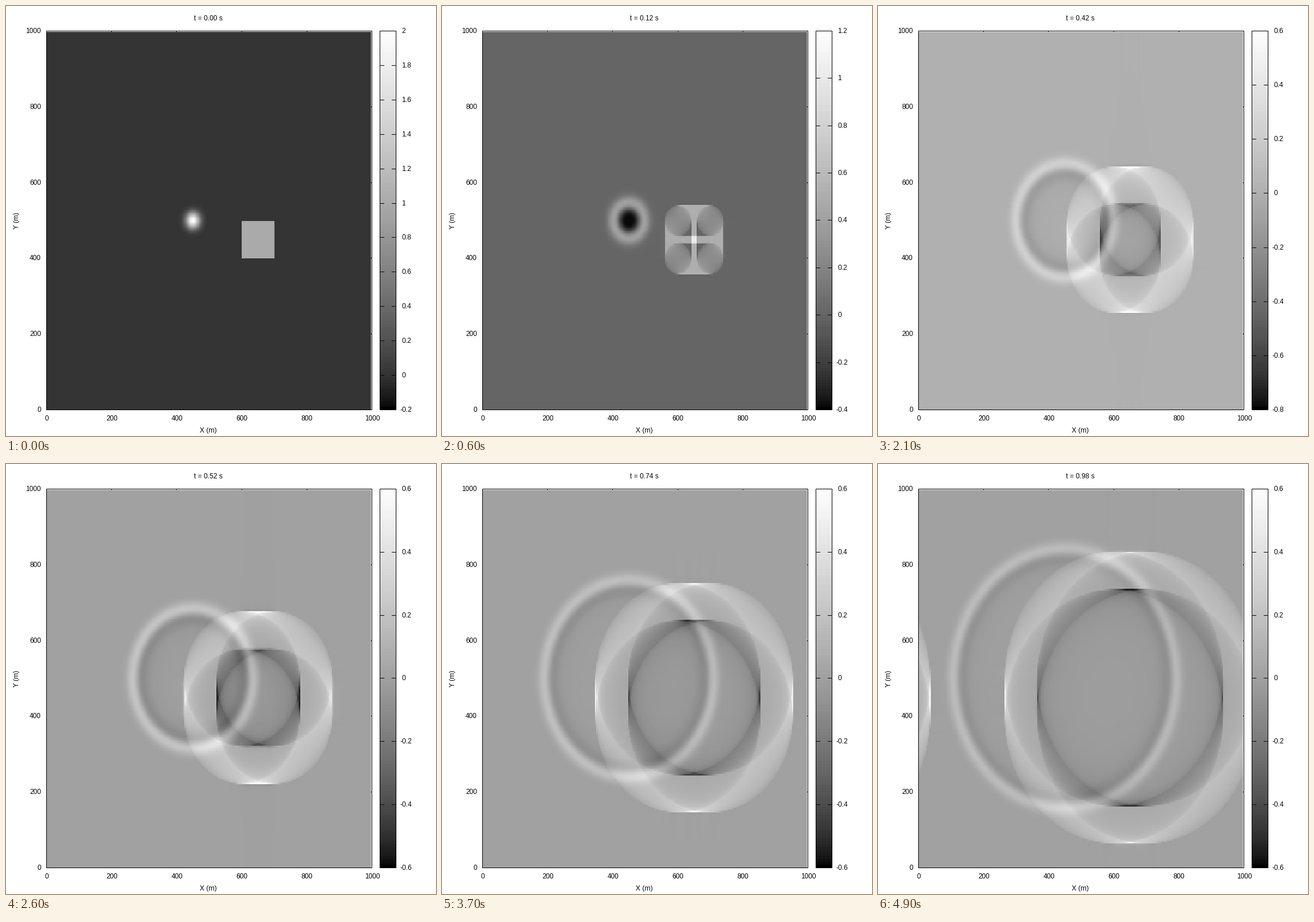
Write a matplotlib script that moves like this. It is 748 by 748 pixels and loops after 5 s.

```python
import math

import matplotlib.pyplot as plt
import numpy as np
from matplotlib.animation import FuncAnimation
from matplotlib.collections import LineCollection
from matplotlib.patches import Rectangle

STAGE, DPI = 748, 100
FRAMES, INTERVAL, DT = 50, 100, 0.02
PX = 72 / DPI  # one pixel in points

# Periodic wave domain, 1000 m wide; every second grid point is plotted
GRID, STRIDE, SIZE, SPEED = 512, 2, 1000.0, 343.0
DX = SIZE / GRID
SHOWN = GRID // STRIDE

# Plot and colour bar boxes in pixels
LEFT, RIGHT, TOP, BOTTOM = 70, 636, 43, 702
BAR_LEFT, BAR_RIGHT, BAR_STEPS = 650, 678, 128

plt.rcParams["font.family"] = "Liberation Sans"
plt.rcParams["font.size"] = 12 * PX
plt.rcParams["text.hinting"] = "native"


def initial_field():
    """A Gaussian bump beside a square block."""
    y, x = np.mgrid[0:GRID, 0:GRID] * DX
    bump = 2 * np.exp(-((x - 450) ** 2 + (y - 500) ** 2) / 20**2)
    block = (x >= 600) & (x <= 700) & (y >= 400) & (y < 500)
    return bump + block


SPECTRUM = np.fft.fft2(initial_field())
k = 2 * np.pi * np.fft.fftfreq(GRID, DX)
OMEGA = SPEED * np.hypot(k[:, None], k[None, :])


def wave(t):
    """Exact spectral solution of the wave equation, starting at rest."""
    field = np.fft.ifft2(SPECTRUM * np.cos(OMEGA * t)).real
    return field[::STRIDE, ::STRIDE]


def colour_range(field):
    """Round the data range outwards to whole tics."""
    low, high = field.min(), field.max()
    tic = 0.2 if high - low >= 1 else 0.1
    return math.floor(low / tic), math.ceil(high / tic), tic


def to_gray(level):
    return np.round(255 * np.clip(level, 0, 1) ** (1 / 1.5)).astype(np.uint8)


def px_x(x):
    return LEFT + (RIGHT - LEFT) * x / SIZE


def px_y(y):
    return BOTTOM - (BOTTOM - TOP) * y / SIZE


fig = plt.figure(figsize=(STAGE / DPI, STAGE / DPI), dpi=DPI, facecolor="white")
ax = fig.add_axes([0, 0, 1, 1])
ax.axis("off")


def label(x, y, text="", ha="center", **kw):
    kw.setdefault("va", "baseline")
    return ax.text(x, y, text, ha=ha, color="black", **kw)


def gray_image(data, x0, x1, y0, y1):
    return ax.imshow(data, cmap="gray", vmin=0, vmax=255, aspect="auto",
                     interpolation="nearest", zorder=1,
                     extent=(x0 - 0.5, x1 + 0.5, y1 + 0.5, y0 - 0.5))


# Whole coordinates are pixel centres, so unsnapped 1 px strokes stay crisp
def lines(segments):
    return ax.add_collection(LineCollection(
        segments, colors="black", linewidths=PX, snap=False, zorder=3))


def frame_box(x0, x1):
    ax.add_patch(Rectangle((x0, TOP), x1 - x0, BOTTOM - TOP, fill=False,
                           edgecolor="black", linewidth=PX, snap=False,
                           zorder=4))


# Nearest plotted point for every pixel of the map
cols = np.arange(LEFT + 1, RIGHT - 1)
rows = np.arange(TOP + 2, BOTTOM)
col_index = np.rint((cols - LEFT) / (RIGHT - LEFT) * SHOWN)
row_index = np.rint((BOTTOM - rows) / (BOTTOM - TOP) * SHOWN)
PIXELS = np.ix_(np.minimum(row_index, SHOWN - 1).astype(int),
                np.minimum(col_index, SHOWN - 1).astype(int))

field_image = gray_image(np.zeros((len(rows), len(cols)), np.uint8),
                         cols[0], cols[-1], rows[0], rows[-1])

bar_rows = np.arange(TOP + 1, BOTTOM)
bar_level = np.floor((BOTTOM - bar_rows) / (BOTTOM - TOP) * BAR_STEPS) / BAR_STEPS
gray_image(to_gray(bar_level)[:, None], BAR_LEFT + 1, BAR_RIGHT - 1,
           bar_rows[0], bar_rows[-1])

frame_box(LEFT, RIGHT)
frame_box(BAR_LEFT, BAR_RIGHT)

for value in range(0, 1001, 200):
    label(px_x(value) + 0.5, 720.5, str(value))
    label(60.5, px_y(value) + 3.5, str(value), ha="right")

# The map hides all but the ends of the top and right tics
inner = range(200, 1000, 200)
lines([[(round(px_x(v)), TOP), (round(px_x(v)), TOP + 1.5)] for v in inner]
      + [[(RIGHT, round(px_y(v))), (RIGHT - 1.5, round(px_y(v)))] for v in inner])

label(351.5, 741.5, "X (m)")
label(18, 373, "Y (m)", rotation=90, va="center")
title = label(351, 24.5)
bar_tics = lines([])
bar_labels = [label(0, 0, ha="left") for _ in range(24)]

ax.set_xlim(-0.5, STAGE - 0.5)
ax.set_ylim(STAGE - 0.5, -0.5)


def update(frame):
    t = frame * DT
    field = wave(t)
    first, last, tic = colour_range(field)
    level = (field / tic - first) / (last - first)
    field_image.set_data(to_gray(level)[PIXELS])
    title.set_text(f"t = {t:.2f} s")

    segments = []
    for text in bar_labels:
        text.set_text("")
    for text, n in zip(bar_labels, range(first, last + 1)):
        y = BOTTOM - (BOTTOM - TOP) * (n - first) / (last - first)
        text.set_position((685 if n < 0 else 688, y + 3.5))
        text.set_text(f"{round(n * tic, 1):g}")
        row = round(y)
        segments += [[(BAR_LEFT, row), (BAR_LEFT + 7.5, row)],
                     [(BAR_RIGHT - 7.5, row), (BAR_RIGHT, row)]]
    bar_tics.set_segments(segments)
    return [field_image, title, bar_tics, *bar_labels]


animation = FuncAnimation(fig, update, frames=FRAMES, interval=INTERVAL,
                          repeat=True, repeat_delay=0, blit=False)
plt.show()
```
